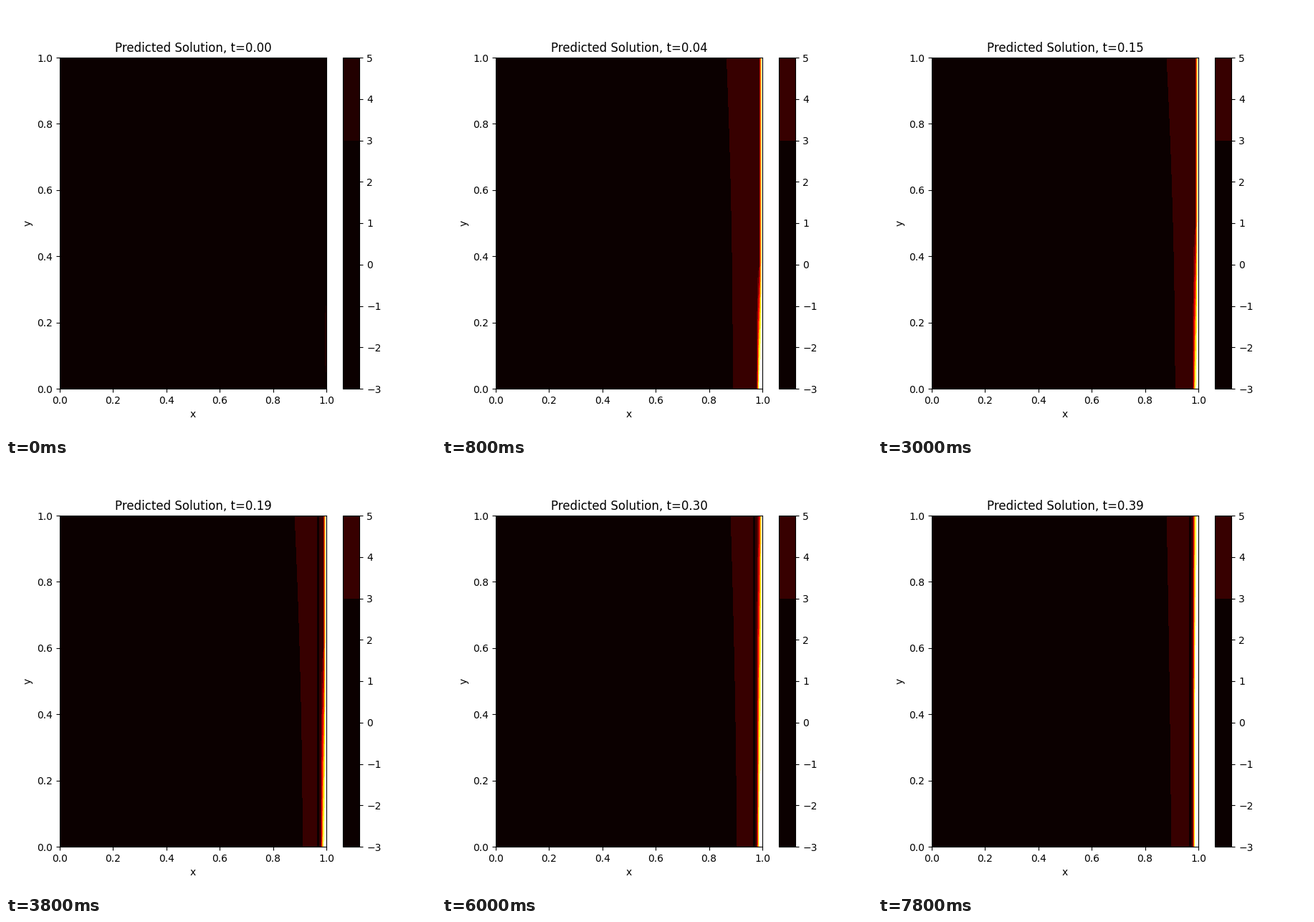
Animation, 600 px wide and 600 px high, one loop 8 s. Source, as a matplotlib script:

```python
import numpy as np
import matplotlib.pyplot as plt
from matplotlib.animation import FuncAnimation
from matplotlib.cm import ScalarMappable
from matplotlib.colors import BoundaryNorm, ListedColormap

FRAMES, STEP_MS = 40, 200
LEVELS = np.append(np.arange(-3, 90, 6), 200)
HOT = plt.get_cmap("hot")
SHADES = [HOT(k / 15) for k in range(16)]
FAINT = HOT(1 / 28)

XS = np.linspace(0, 1, 100)
YS = np.linspace(0, 1, 100)


def start_field():
    u = np.zeros((YS.size, XS.size))
    u[:, -2] = 1
    u[:, -1] = np.maximum(0, 5 - 2 * ((YS - 0.15) / 0.1) ** 2)
    return u


def warm_front(t):
    """Left edge of the warm band at every height, in axes units."""
    settle = np.exp(-t / 0.03)
    bottom = 0.925 - 0.067 * t - 0.121 * settle
    top = 0.882 - 0.059 * settle
    return bottom - (bottom - top) * YS ** (2.3 - 2 * t)


def hot_layer(t):
    """Temperature one cell inside the heated wall, cooling with height."""
    base = 76 + 600 * (t - 0.14) ** 2 + 40 * np.exp(-t / 0.04)
    slope = 290 * np.exp(-4.8 * t)
    return np.clip(base - slope * YS, 4, 100)


def field(t):
    front = warm_front(t)[:, None]
    u = np.maximum(-2.9, 3 + (XS - front) / (0.96 - front))
    u[:, -4] = np.interp(t, [0.10, 0.19], [4.5, 1.5])
    u[:, -3] = 4
    u[:, -2] = hot_layer(t)
    u[:, -1] = 100
    return u


fig, ax = plt.subplots(figsize=(6, 6), dpi=100)
scale = ScalarMappable(BoundaryNorm([-3, 3, 5], 2), ListedColormap(SHADES[:2]))
fig.colorbar(scale, ax=ax, spacing="proportional", ticks=range(-3, 6))
ax.set(xlim=(0, 1), ylim=(0, 1), xlabel="x", ylabel="y")
title = ax.set_title("")

shown = []


def draw(i):
    while shown:
        shown.pop().remove()
    t = i / 100
    u = field(t) if i else start_field()
    warm = SHADES[1] if i else FAINT
    colors = [SHADES[0], warm] + SHADES[2:]
    shown.append(ax.contourf(XS, YS, u, levels=LEVELS, colors=colors))
    scale.set_cmap(ListedColormap(colors[:2]))
    title.set_text(f"Predicted Solution, t={t:.2f}")
    return []


anim = FuncAnimation(fig, draw, frames=FRAMES, interval=STEP_MS,
                     init_func=lambda: draw(0), repeat=True, repeat_delay=0)
plt.show()
```
